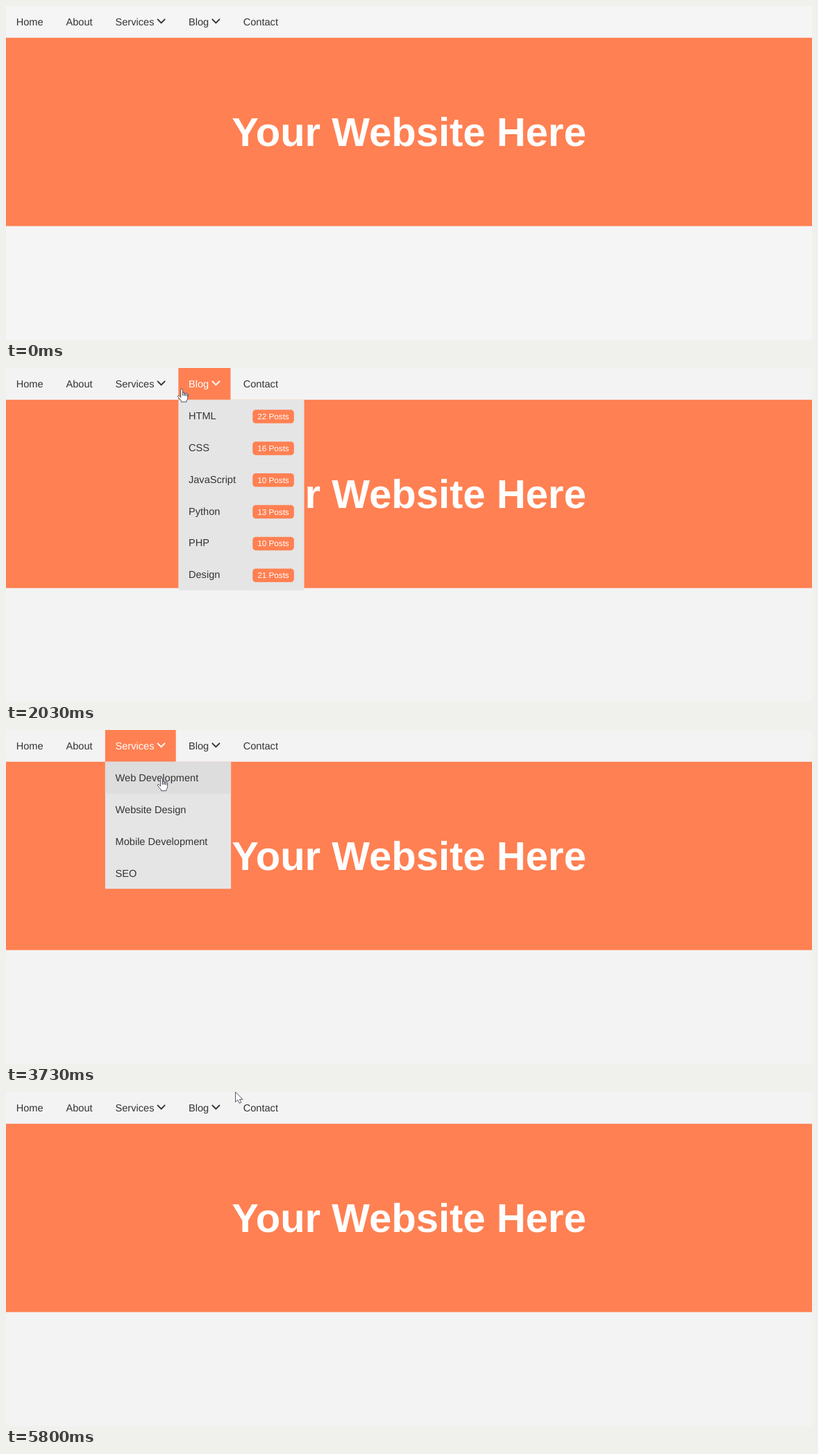
Write an HTML page that moves like this. It is 1161 px wide and 482 px high and loops after 6.29 s.

```html
<!DOCTYPE html>
<html lang="en">
<head>
<meta charset="utf-8">
<title>Navigation bar with dropdown menus</title>
<style>
html, body { margin: 0; width: 100%; height: 100%; overflow: hidden; background: #f3f3f3; }
svg { display: block; font: 14.58px "Liberation Sans", Arial, sans-serif; text-rendering: geometricPrecision; }
.title { font-size: 58px; font-weight: bold; text-anchor: middle; }
.badge { font-size: 11.66px; text-anchor: middle; }
</style>
</head>
<body>
<svg id="stage" width="1161" height="482" viewBox="0 0 1161 482"></svg>
<script>
const LOOP = 6290, WIDTH = 1161, ROW = 45.83, PAD = 14.67, GAP = 3.6;
const MENU_WIDTH = 181.2, BADGE_WIDTH = 59.6, CHEVRON_WIDTH = 16.6;
const CORAL = '#ff8052', INK = '#333';
const stage = document.getElementById('stage');

const links = [
  { label: 'Home' },
  { label: 'About' },
  { label: 'Services', rows: [['Web Development'], ['Website Design'], ['Mobile Development'], ['SEO']] },
  { label: 'Blog', rows: [['HTML', 22], ['CSS', 16], ['JavaScript', 10], ['Python', 13], ['PHP', 10], ['Design', 21]] },
  { label: 'Contact' }
];

// Lay the links out from left to right by the width of their labels
const ruler = document.createElement('canvas').getContext('2d');
ruler.font = '14.58px "Liberation Sans", Arial, sans-serif';
let left = 0;
for (const link of links) {
  link.x = left;
  link.textWidth = ruler.measureText(link.label).width;
  link.w = link.textWidth + 2 * PAD + (link.rows ? CHEVRON_WIDTH : 0);
  left += link.w + GAP;
}

// Places where the pointer slows down: time, x, y
const stops = [
  [1090, 200, 0], [1500, 40, 26], [1720, 97, 25], [2130, 280, 32], [2430, 221, 33.5],
  [2890, 221, 62], [3370, 221, 159], [3590, 221, 175], [3800, 225, 34], [3960, 275, 36],
  [4290, 294.5, 168.5], [4840, 292, 266], [5390, 288, 29], [5800, 330.5, 0]
];

const ease = k => k * k * (3 - 2 * k);

function pointerAt(t) {
  const i = stops.findIndex(stop => stop[0] > t);
  if (i === 0) return null;
  if (i < 0) return stops.at(-1).slice(1);
  const [t0, x0, y0] = stops[i - 1], [t1, x1, y1] = stops[i];
  const k = ease((t - t0) / (t1 - t0));
  return [x0 + (x1 - x0) * k, y0 + (y1 - y0) * k];
}

const rect = (x, y, w, h, fill, r = 0) =>
  `<rect x="${x}" y="${y}" width="${w}" height="${h}" rx="${r}" fill="${fill}"/>`;
const text = (s, x, y, fill, style = '') =>
  `<text x="${x}" y="${y}" fill="${fill}" class="${style}">${s}</text>`;

function drawLink({ label, x, w, textWidth, rows }, active) {
  const fill = active ? '#fff' : INK;
  const tip = x + PAD + textWidth + 5.2;
  return (active ? rect(x, 0, w, ROW, CORAL) : '') +
    text(label, x + PAD, 28.2, fill) +
    (rows ? `<path d="M${tip} 19.4l5 5l5-5" fill="none" stroke="${fill}" stroke-width="2" stroke-linecap="round"/>` : '');
}

function drawMenu({ x, rows }, y) {
  const hovered = Math.floor(y / ROW) - 1;
  let out = rect(x, ROW, MENU_WIDTH, rows.length * ROW, '#e5e5e5');
  rows.forEach(([label, posts], i) => {
    const top = ROW * (i + 1), active = i === hovered;
    if (active) out += rect(x, top, MENU_WIDTH, ROW, '#ddd');
    out += text(label, x + PAD, top + 28.2, INK);
    if (posts) {
      const badge = x + MENU_WIDTH - PAD - BADGE_WIDTH;
      out += rect(badge, top + 14.5, BADGE_WIDTH, 19.5, active ? '#d2691e' : CORAL, 4.5) +
        text(posts + ' Posts', badge + BADGE_WIDTH / 2, top + 28.3, '#fff', 'badge');
    }
  });
  return out;
}

const ARROW = 'M0 0V14.5L3.3 11.4L5.7 16.2L8.2 15L5.9 10.6H10.5Z';
const HAND = 'M-1.4 11.5V.8a1.4 1.4 0 0 1 2.8 0V9V5.5' +
  'a1.2 1.2 0 0 1 2.4 .5v3v-3'.repeat(3) +
  'V12Q8.6 14.5 7 16v2H-.6V16.5L-5.6 10.6Q-6 8.6-4 8.8Z';

const drawPointer = ([x, y], shape) =>
  `<path transform="translate(${x} ${y})" d="${shape}" fill="#fff" stroke="#445" stroke-width=".9" stroke-linejoin="round"/>`;

function render(now) {
  const t = now % LOOP, pointer = pointerAt(t);
  const [x, y] = pointer || [0, 0];
  const open = y > 0 && links.find(link => x >= link.x && x < link.x + link.w);
  const menu = open && open.rows;

  stage.innerHTML = rect(0, 0, WIDTH, 482, t < 170 ? '#f5f5f5' : '#f3f3f3') +
    rect(0, ROW, WIDTH, 317.6 - ROW, CORAL) +
    text('Your Website Here', WIDTH / 2, 202, '#fff', 'title') +
    links.map(link => drawLink(link, link === open)).join('') +
    (menu ? drawMenu(open, y) : '') +
    (pointer ? drawPointer(pointer, menu ? HAND : ARROW) : '');
  requestAnimationFrame(render);
}

requestAnimationFrame(render);
</script>
</body>
</html>
```
